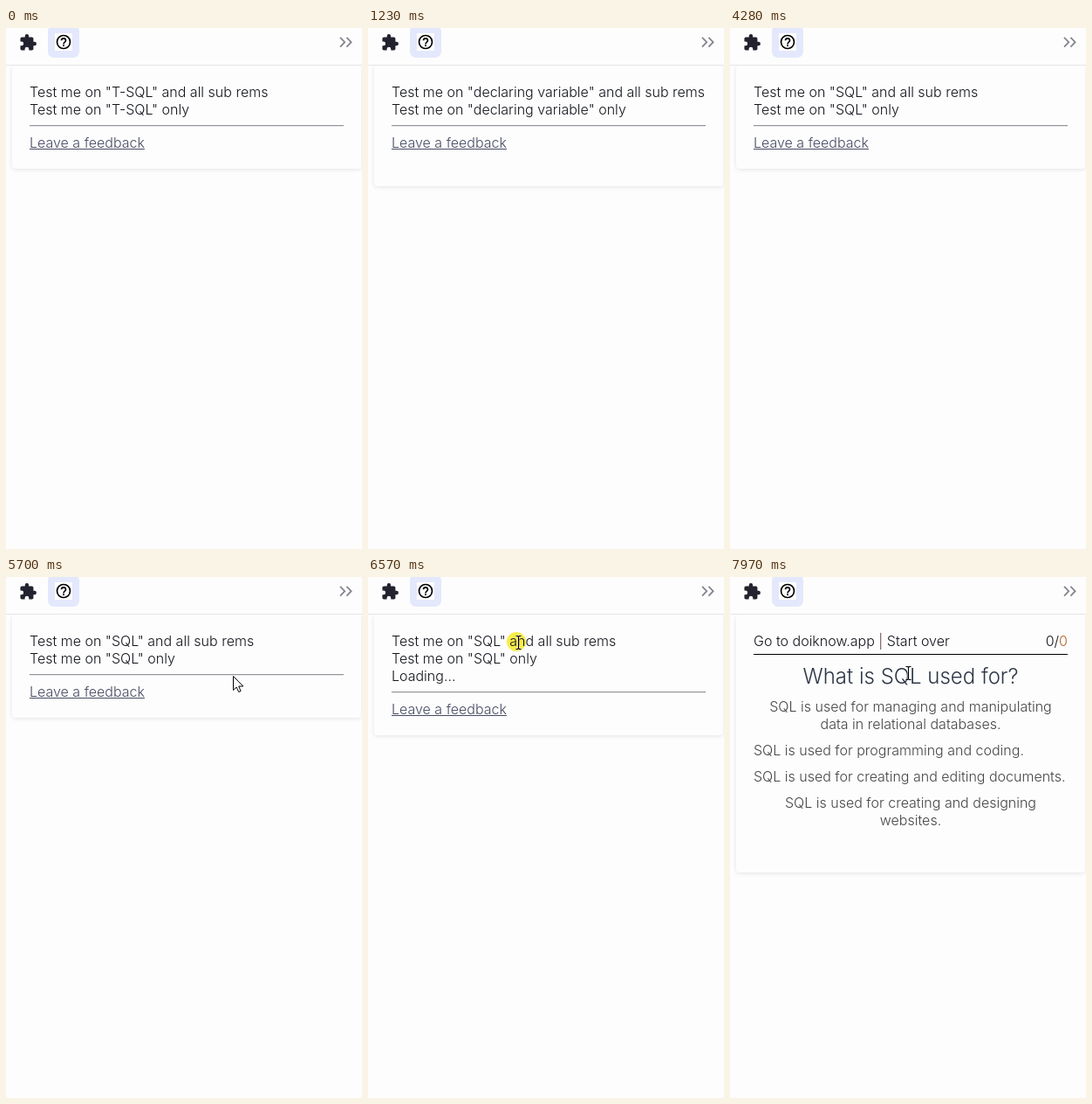
Write an HTML page with a canvas that moves like this. It is 408 by 596 pixels and loops after 8000 ms.

```html
<!DOCTYPE html>
<html lang="en">
<head>
<meta charset="utf-8">
<title>Quiz panel</title>
<style>
html, body { margin: 0; width: 100%; height: 100%; overflow: hidden; background: #fdfdfd; }
#stage {
  position: relative; width: 408px; height: 596px; overflow: hidden;
  font: 300 16px/20px Inter, "Open Sans", sans-serif; color: #14161d;
}
#stage svg, #cursor { position: absolute; left: 0; top: 0; }
#panel {
  position: absolute; left: 7px; top: 43px; width: 400px; border-radius: 4px;
  background: #fdfdfd; box-shadow: 0 1px 5px rgba(0, 0, 0, .1);
}
#bar { position: absolute; left: 0; top: 0; width: 408px; height: 42px; background: #fdfdfd; border-bottom: 1px solid #e6e6e8; }
#spot { position: absolute; border-radius: 50%; background: #f8ec4a; }
.view { position: absolute; left: 27px; top: 63px; width: 360px; }
.item { width: fit-content; text-align: center; }
.rule { height: 1px; margin: 8px 0; background: #96979c; border-bottom: 1px solid #e4e4e6; }
.link { color: #474b63; text-decoration: underline; }
.head { display: flex; justify-content: space-between; height: 25px; border-bottom: 1px solid #000; white-space: pre; }
.head i { font-style: normal; color: #5a3a38; }
.head b { font-weight: 300; color: #b4622a; }
.title { height: 30px; margin: 10px 0 9px; font-size: 24px; line-height: 30px; text-align: center; color: #2c3646; }
.answer { width: fit-content; margin-bottom: 10px; text-align: center; color: #454545; }
</style>
</head>
<body>
<div id="stage">
  <div id="panel"></div>
  <div id="bar"></div>
  <svg width="408" height="43" fill="none">
    <rect x="48" y="-3" width="36" height="37" rx="7" fill="#e4e8fc"/>
    <rect x="56" y="6" width="20" height="20" fill="#fdfdfd"/>
    <path transform="translate(14.7 6.1) scale(.88)" fill="#23232f" d="M20.5 11H19V7c0-1.1-.9-2-2-2h-4V3.5a2.5 2.5 0 0 0-5 0V5H4c-1.1 0-2 .9-2 2v3.8h1.5a2.7 2.7 0 0 1 0 5.4H2V20c0 1.1.9 2 2 2h3.8v-1.5a2.7 2.7 0 0 1 5.4 0V22H17c1.1 0 2-.9 2-2v-4h1.5a2.5 2.5 0 0 0 0-5z"/>
    <g transform="translate(56 6) scale(.8333)" stroke="#000" stroke-width="2">
      <circle cx="12" cy="12" r="9"/>
      <path d="M9 10a3 3 0 0 1 6 0c0 2.2-3 2.2-3 5M12 16v2"/>
    </g>
    <path d="M383 10.8l5.2 5.4-5.2 5.4M390.4 10.8l5.2 5.4-5.2 5.4" stroke="#85858f" stroke-width="1.8"/>
  </svg>
  <div id="spot"></div>
  <div id="menu" class="view">
    <div id="all" class="item"></div>
    <div id="only" class="item"></div>
    <div id="wait" class="item">Loading...</div>
    <div class="rule"></div>
    <div class="link">Leave a feedback</div>
  </div>
  <div id="quiz" class="view">
    <div class="head"><span>Go to doiknow.app <i>|</i> Start over</span><span>0/<b>0</b></span></div>
    <div class="title">What is SQL used for?</div>
    <div class="answer">SQL is used for managing and manipulating data in relational databases.</div>
    <div class="answer">SQL is used for programming and coding.</div>
    <div class="answer">SQL is used for creating and editing documents.</div>
    <div class="answer">SQL is used for creating and designing websites.</div>
  </div>
  <canvas id="cursor" width="408" height="596"></canvas>
</div>
<script>
const LOOP = 8000, LOAD = 6570, QUIZ = 6840;
const el = id => document.getElementById(id);
const ctx = el('cursor').getContext('2d');

const topics = [[0, 'T-SQL'], [500, 'SQL'], [1230, 'declaring variable'], [2450, 'if/else/etc'], [4280, 'SQL']];
// I-beam stops: time, x, y
const stops = [
  [6240, 169, 82], [6440, 172, 75], [7500, 179, 84], [7570, 195, 103],
  [7640, 205, 114], [7900, 207, 112], [7970, 204, 110]
];

const latest = (list, t) => list.filter(e => e[0] <= t).pop();
const show = (id, on) => { el(id).style.display = on ? '' : 'none'; };

function drawArrow(x, y) {
  ctx.save();
  ctx.translate(x + .5, y + .5);
  const p = new Path2D('M0 0V16L3.7 12.5L6.2 18L8.6 17L6.2 11.5H11.3Z');
  ctx.fillStyle = '#fff';
  ctx.fill(p);
  ctx.strokeStyle = '#000';
  ctx.lineWidth = 1;
  ctx.stroke(p);
  ctx.restore();
}

function drawBeam(x, y) {
  ctx.save();
  ctx.translate(x + .5, y);
  const p = new Path2D('M-3 -7.5H-1L0 -6.5L1 -7.5H3M0 -6.5V6.5M-3 7.5H-1L0 6.5L1 7.5H3');
  for (const [color, width] of [['rgba(255,255,255,.6)', 2.4], ['#000', 1.1]]) {
    ctx.strokeStyle = color;
    ctx.lineWidth = width;
    ctx.stroke(p);
  }
  ctx.restore();
}

// Pointer enters at the left, swings right, then settles on the first item
function arrowAt(t) {
  const step = Math.min(9, Math.floor((t - 5350) / 76.6));
  const u = 1 - (1 - (step + .5) / 9.5) ** 1.6, v = 1 - u;
  const bez = (a, b, c, d) => v * v * v * a + 3 * v * v * u * b + 3 * v * u * u * c + u * u * u * d;
  return [bez(-12, 190, 380, 170), bez(214, 225, 60, 80)].map(Math.round);
}

function drawCursor(t) {
  ctx.clearRect(0, 0, 408, 596);
  if (t < 5350) return;
  if (t < 6240) drawArrow(...arrowAt(t));
  else drawBeam(...latest(stops, t).slice(1));
}

let topic = null;
function render(t) {
  const name = latest(topics, t)[1], loading = t >= LOAD && t < QUIZ;
  if (name !== topic) {
    topic = name;
    el('all').textContent = `Test me on "${name}" and all sub rems`;
    el('only').textContent = `Test me on "${name}" only`;
  }
  show('menu', t < QUIZ);
  show('quiz', t >= QUIZ);
  show('wait', loading);
  const tall = loading || name.length > 12;
  el('panel').style.height = (t >= QUIZ ? 295 : tall ? 138 : 118) + 'px';

  show('spot', t >= 6440 && t < QUIZ);
  const r = t < 6510 ? 12 : 11, s = el('spot').style;
  s.left = 170 - r + 'px';
  s.top = 74 - r + 'px';
  s.width = s.height = 2 * r + 'px';
  drawCursor(t);
}

const start = performance.now();
function tick() {
  render((performance.now() - start) % LOOP);
  requestAnimationFrame(tick);
}
render(0);
requestAnimationFrame(tick);
</script>
</body>
</html>
```
